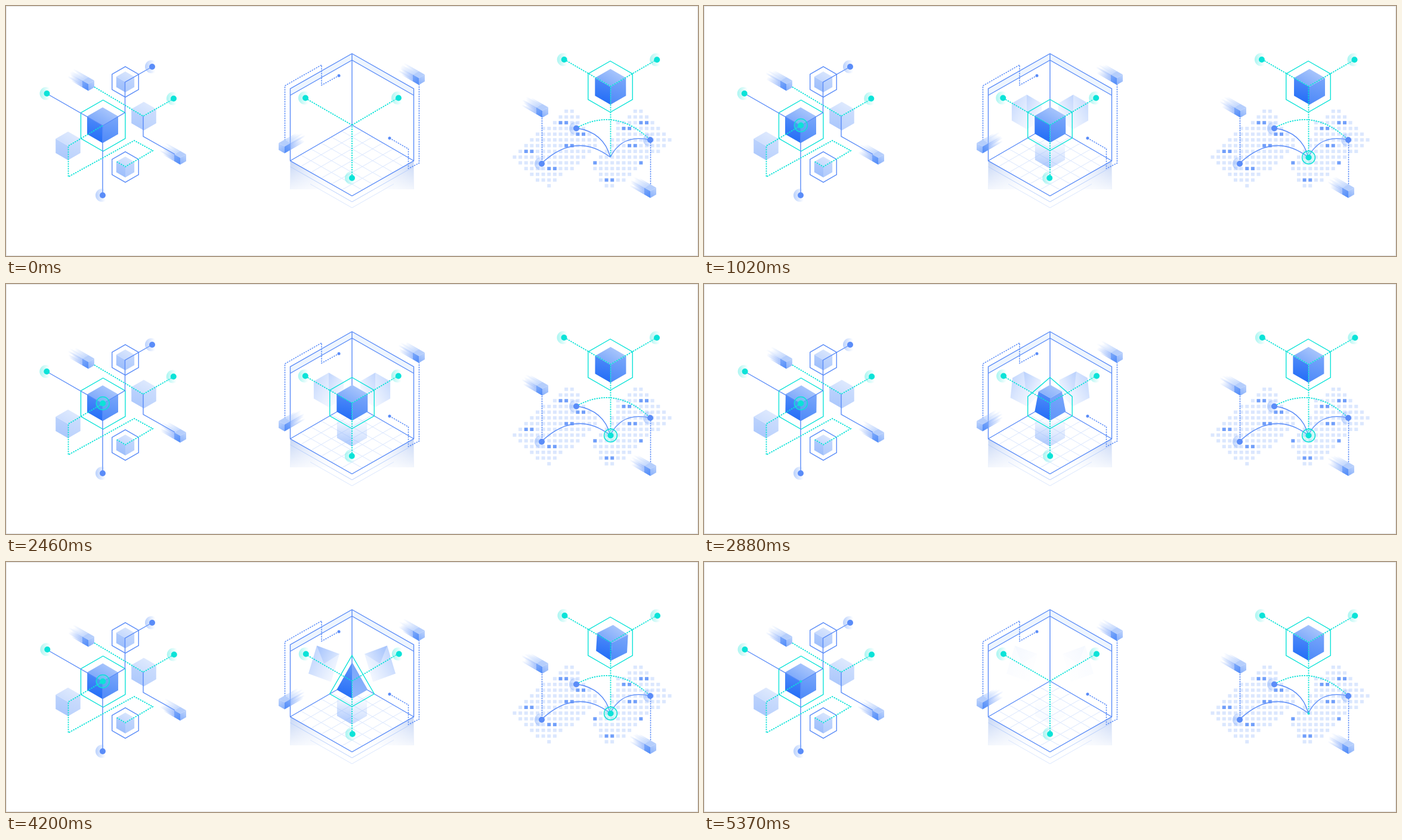
An HTML page with a canvas that plays this animation: 1160 by 420 pixels, repeating every 5.4 s.

```html
<!DOCTYPE html>
<html lang="en">
<head>
<meta charset="utf-8">
<title>Isometric cubes</title>
<style>
  html, body { margin: 0; height: 100%; overflow: hidden; background: #fff; }
  canvas { display: block; }
</style>
</head>
<body>
<canvas id="stage" width="1160" height="420"></canvas>
<script>
const ctx = document.getElementById('stage').getContext('2d');
const LOOP = 5400, TAU = Math.PI * 2;
const BLUE = '#5a8cf8', TEAL = '#0be3d8', FAINT = '#dbe7fe';
const DOTS = [2.4, 1.6];

const clamp = v => Math.max(0, Math.min(1, v));
const ease = v => v * v * (3 - 2 * v);
const ramp = (t, from, to) => ease(clamp((t - from) / (to - from)));
const bell = (p, at) => Math.exp(-(((p - at) / .09) ** 2));
const mix = (a, b, k) => a + (b - a) * k;
const between = (p, q, k) => [mix(p[0], q[0], k), mix(p[1], q[1], k)];
const morph = (ps, qs, k) => ps.map((p, i) => between(p, qs[i], k));
const mirror = pts => pts.map(([x, y]) => [1160 - x, y]);
const shade = dark => `hsl(219 93% ${100 - dark}%)`;

function trace(pts, closed) {
  ctx.beginPath();
  pts.forEach(p => ctx.lineTo(...p));
  if (closed) ctx.closePath();
}

function strokePath(color, dash = [], width = 1.4) {
  ctx.strokeStyle = color;
  ctx.lineWidth = width;
  ctx.setLineDash(dash);
  ctx.stroke();
}

function line(pts, color, dash, width) {
  trace(pts);
  strokePath(color, dash, width);
}

function loop(pts, color) {
  trace(pts, true);
  strokePath(color);
}

const dotted = (color, ...pts) => line(pts, color, DOTS, color === TEAL ? 1.8 : 1.5);

function fill(pts, style) {
  trace(pts, true);
  ctx.fillStyle = style;
  ctx.fill();
}

function gradient(x0, y0, x1, y1, from, to) {
  const g = ctx.createLinearGradient(x0, y0, x1, y1);
  g.addColorStop(0, from);
  g.addColorStop(1, to);
  return g;
}

function disc(x, y, r, style) {
  ctx.beginPath();
  ctx.arc(x, y, r, 0, TAU);
  ctx.fillStyle = style;
  ctx.fill();
}

function curve(x0, y0, cx, cy, x1, y1, color, dash, width) {
  ctx.beginPath();
  ctx.moveTo(x0, y0);
  ctx.quadraticCurveTo(cx, cy, x1, y1);
  strokePath(color, dash, width);
}

const hex = (x, y, r) => Array.from({ length: 6 }, (_, i) =>
  [x + r * Math.sin(i * TAU / 6), y - r * Math.cos(i * TAU / 6)]);

// depth scales the shading; peak = 1 gathers the top into the tip of a pyramid.
function cube(x, y, r, depth, tilt = 0, peak = 0) {
  const ring = (cy, size) => [0, 1, 2, 3].map(i =>
    [.866 * r * size * Math.cos(i * TAU / 4), cy + .5 * r * size * Math.sin(i * TAU / 4)]);
  const up = ring(-r * mix(.5, 1.03, peak), 1 - peak);
  const low = ring(r * .5, 1);
  const tone = v => shade(v * depth);
  ctx.save();
  ctx.translate(x, y);
  ctx.rotate(tilt);
  fill([up[2], up[1], low[1], low[2]], gradient(0, -r, -r * .3, r, tone(32), tone(45)));
  fill([up[1], up[0], low[0], low[1]],
    gradient(0, r, r * .5, -r, tone(mix(36, 22, peak)), tone(mix(25, 28, peak))));
  if (peak < 1) fill(up, gradient(-r * .3, 0, r * .3, -r, tone(27), tone(17)));
  ctx.restore();
}

// Small box with a tail of fading streaks.
function comet(x, y, p, flip = 1) {
  const r = 11.5, w = 10, h = r / 2;
  ctx.save();
  ctx.translate(x, y);
  ctx.scale(flip, 1);
  const streak = (a, b, i, rgb, alpha) => {
    const n = 24 + 4 * Math.sin(TAU * (p * 4 + x * .37 + i * .37));
    const back = ([u, v]) => [u - .866 * n, v - .5 * n];
    fill([a, b, back(b), back(a)],
      gradient(...a, ...back(a), `rgba(${rgb},${alpha})`, `rgba(${rgb},0)`));
  };
  const corner = [-w, -h], top = [0, -r], foot = [-w, h];
  for (let i = 0; i < 4; i++) {
    const a = i / 4, b = a + .25;
    streak(between(corner, top, a), between(corner, top, b), i, '150,186,252', .55);
    streak(between(corner, foot, a), between(corner, foot, b), i + 4, '116,160,250', .65);
  }
  fill([[0, 0], [w, -h], top, corner], shade(15));
  fill([corner, [0, 0], [0, r], foot], gradient(-w, 0, 0, r, shade(28), shade(36)));
  fill([[0, 0], [w, -h], [w, h], [0, r]], gradient(w, -h, 0, r, shade(13), shade(25)));
  ctx.restore();
}

function node(x, y, color, drift = 0) {
  const rgb = color === TEAL ? '100,238,230' : '130,172,252';
  x += drift;
  disc(x - 1, y, 11, gradient(x - 12, y, x + 5, y, `rgba(${rgb},.55)`, `rgba(${rgb},0)`));
  disc(x, y, 5, color);
}

function beacon(x, y, size) {
  disc(x, y, 11 * size, 'rgba(80,230,225,.25)');
  ctx.beginPath();
  ctx.arc(x, y, 11 * size, 0, TAU);
  strokePath(TEAL);
  disc(x, y, 5 * size, TEAL);
}

function network(p, drift, mark) {
  const swing = bell(p, .63);
  comet(138, 131, p);
  comet(292, 255, p);
  cube(231, 185, 24, .38);
  cube(104, 235, 24, .38);
  for (const y of [127.5, 270.5]) {
    cube(200, y, 17.5, .45);
    loop(hex(200, y, 25.7), BLUE);
  }
  loop(hex(162.7, 201, 43), TEAL);
  cube(162 + 2 * swing, 200.3, 30, 1, .05 * swing);

  line([[68, 147], [162, 201], [162, 318]], BLUE);
  line([[245, 102], [199.5, 128], [199.5, 179], [162, 201]], BLUE);
  line([[230, 185], [230, 219], [283, 249]], BLUE);
  dotted(TEAL, [148, 136], [230, 185], [281, 156]);
  dotted(TEAL, [162, 201], [104.5, 235], [104.5, 287], [215, 226], [246, 243], [200, 270], [185, 261]);
  node(68.5, 147, TEAL, drift);
  node(281, 155.5, TEAL, drift);
  node(245, 102, BLUE);
  node(162, 318, BLUE);
  beacon(162.3, 200.5, mark);
}

// Faded print of a solid with one facet, weakening from a toward b.
function print(outline, facet, a, b) {
  const fade = gradient(...a, ...b, 'rgba(135,175,252,.52)', 'rgba(160,192,252,0)');
  fill(outline, fade);
  fill(facet, fade);
}

function room(p, t, drift) {
  const top = [580, 80], back = [580, 200], front = [580, 319];
  const left = [476.5, 260], right = [683.5, 260];
  for (const s of [-1, 1]) {
    const edge = 580 + s * 103.5, inner = 580 + s * 20;
    const area = [[edge, 260], [inner, 308], [edge, 308]];
    fill(area, gradient(edge, 0, inner, 0, 'rgba(140,172,235,.48)', 'rgba(170,195,245,0)'));
    fill(area, gradient(0, 262, 0, 309, 'rgba(255,255,255,0)', 'rgba(255,255,255,.8)'));
    fill([top, [edge, 139], [edge, 150], [580, 91]], '#eef5fe');
  }
  line([[476.5, 270], [580, 329], [683.5, 270]], shade(14), [], 1);
  line([[510, 299], [580, 339], [650, 299]], FAINT, [], 1);
  for (let k = 1 / 6; k < .9; k += 1 / 6) {
    line([between(back, left, k), between(right, front, k)], FAINT, [], 1);
    line([between(back, right, k), between(left, front, k)], FAINT, [], 1);
  }

  const peak = ramp(t, 2750, 3150);
  const ghost = ramp(t, 200, 800) * (1 - ramp(t, 4800, 5500));
  const solid = ramp(t, 300, 850) * (1 - ramp(t, 4750, 5250));

  // The wall prints turn from a cube's outline into a tilted rectangle.
  ctx.globalAlpha = ghost;
  const tilted = [[-1, -1], [1, -1], [1, -1], [1, 1], [-1, 1], [-1, -1]].map(([u, v]) =>
    [533 + 19 * u - 7 * v, 171 + 7 * u + 23.5 * v]);
  const wall = morph(hex(541, 178, 29), tilted, peak);
  const facet = [...wall.slice(0, 3), between(wall[0], wall[3], .5)];
  print(wall, facet, [508, 163], [566, 193]);
  print(mirror(wall), mirror(facet), [652, 163], [594, 193]);
  const floor = hex(580, 244, 29);
  print(floor, [[580, 244], ...floor.slice(3, 5), floor[5]], [580, 278], [580, 222]);
  ctx.globalAlpha = 1;

  loop([top, [683.5, 139], right, front, left, [476.5, 139]], BLUE);
  line([[476.5, 150], [580, 91], [683.5, 150]], BLUE);
  line([top, back], BLUE);
  line([left, back, right], BLUE);

  ctx.globalAlpha = solid;
  const shell = hex(580, 200, 43);
  const cone = [0, 2, 2, 3, 4, 4].map(i => shell[i]);
  loop(morph(shell, cone, peak), TEAL);
  cube(580.3, 199.5, 30, 1, 0, peak);
  ctx.globalAlpha = 1;

  dotted(BLUE, [467.5, 226], [467.5, 134], [529, 99], [529, 133], [558, 117]);
  dotted(BLUE, [643, 222], [674.5, 240], [674.5, 273], [692.5, 264], [692.5, 132]);
  disc(558, 117, 2.5, BLUE);
  disc(643, 222, 2.5, BLUE);
  dotted(TEAL, [502, 155], back, [580, 289]);
  dotted(TEAL, [658, 154], back);
  node(502, 154.5, TEAL, drift);
  node(658, 154.5, TEAL, drift);
  node(580, 289, TEAL, drift);
  comet(692, 121, p);
  comet(467, 236, p, -1);
}

// Coastlines of the two land masses and the centres of bright tile pairs.
const COASTS = [
  [[947, 171], [994, 228], [962, 262], [910, 308], [843, 254], [903, 202]],
  [[1061, 171], [1117, 226], [1018, 308], [1000, 304], [977, 262], [1012, 240], [1024, 196]]
];
const BRIGHT = [[936, 196], [1069, 196], [1038, 206], [965, 215], [944, 234], [1051, 234],
  [880, 244], [917, 273], [985, 263], [1067, 263], [1014, 292]];

function map() {
  const step = 9.63;
  for (const coast of COASTS) {
    trace(coast, true);
    for (let y = 177; y < 305; y += step) {
      for (let x = 852.5; x < 1118; x += step) {
        if (!ctx.isPointInPath(x, y)) continue;
        const lit = BRIGHT.some(([u, v]) => Math.abs(u - x) < step && Math.abs(v - y) < step / 2);
        ctx.fillStyle = lit ? '#719ffa' : '#dbe7fe';
        ctx.fillRect(x - 3, y - 3, 6, 5.6);
      }
    }
  }
}

function world(p, drift, mark) {
  const swing = bell(p, .76), sway = -Math.cos(TAU * 2 * p);
  map();
  comet(899, 176, p);
  loop(hex(1013, 135.5, 43), TEAL);
  cube(1014.3 + sway + swing * .7, 135.8, 30, 1, .06 * swing);
  dotted(TEAL, [936, 90], [1013.5, 135], [1013.5, 254]);
  dotted(TEAL, [1091, 90], [1013.5, 135]);
  dotted(BLUE, [898.5, 188], [898.5, 265]);
  dotted(BLUE, [1080.5, 225], [1080.5, 300]);
  comet(1080, 311, p);

  curve(956, 205, 1022, 169, 1080, 225, TEAL, DOTS, 1.8);
  curve(897, 265, 955, 210, 1013, 254, BLUE);
  curve(956, 205, 1002, 212, 1013, 254, BLUE);
  curve(1080, 225, 1033, 214, 1013, 254, BLUE);
  node(956, 205.5, BLUE);
  node(898, 265, BLUE);
  node(1080, 225, BLUE);
  node(935.7, 90, TEAL, drift);
  node(1091.2, 90.2, TEAL, drift);
  beacon(1013.5, 254.5, mark);
}

function draw(now) {
  const t = now % LOOP, p = t / LOOP;
  const mark = ramp(t, 200, 700) * (1 - ramp(t, 4900, 5500));
  const drift = -.8 * Math.sin(TAU * p);
  ctx.fillStyle = '#fff';
  ctx.fillRect(0, 0, 1160, 420);
  network(p, drift, mark);
  room(p, t, drift);
  world(p, drift, mark);
  ctx.strokeStyle = '#e0e0e0';
  ctx.lineWidth = 1;
  ctx.setLineDash([]);
  ctx.strokeRect(.5, .5, 1159, 419);
}

let start;
function tick(now) {
  start ??= now;
  draw(now - start);
  requestAnimationFrame(tick);
}
requestAnimationFrame(tick);
</script>
</body>
</html>
```
